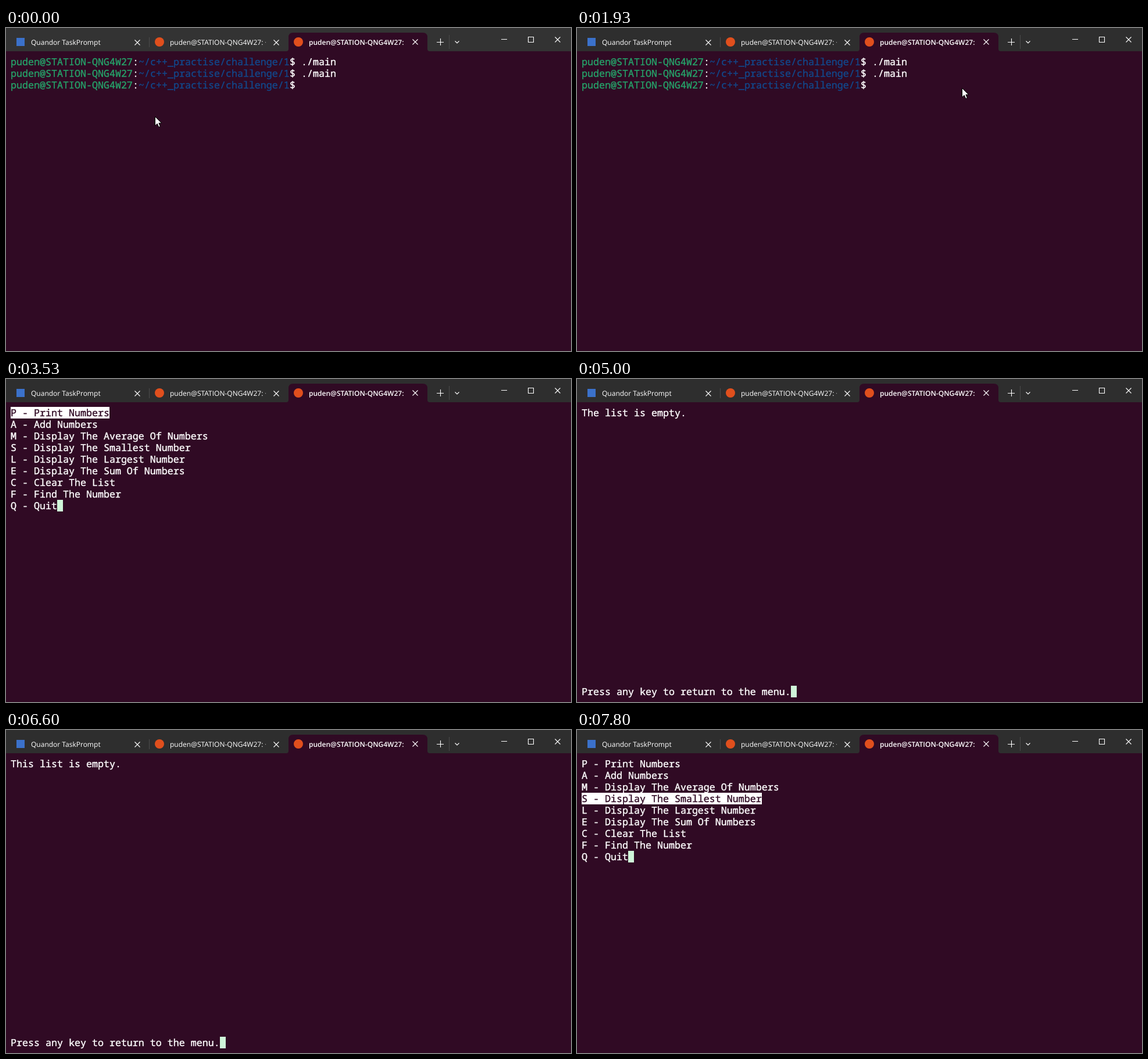
An HTML page that plays this animation: 972x556 px, repeating every 8000 ms.

```html
<!DOCTYPE html>
<html lang="en">
<head>
<meta charset="utf-8">
<title>Terminal menu</title>
<style>
  html, body { margin: 0; width: 100%; height: 100%; overflow: hidden; background: #300a24; }
  svg { display: block; width: 972px; height: 556px; }
  text { white-space: pre; text-rendering: geometricPrecision; }
  .term text { font: 16.667px "Noto Sans Mono", "DejaVu Sans Mono", monospace; fill: #fff; stroke: #fff; stroke-width: .4px; }
  .term .user { fill: #26a269; stroke: #26a269; }
  .term .path { fill: #12488b; stroke: #12488b; }
  .term .dark { fill: #300a24; stroke: #300a24; }
  .title { font: 12px "Open Sans", "Noto Sans", sans-serif; fill: #fff; }
  .active { font-weight: 600; }
  .line { fill: none; stroke: #fff; stroke-width: 1.1; }
</style>
</head>
<body>
<svg viewBox="0 0 972 556">
  <defs>
    <path id="cross" class="line" d="M-4.5-4.5 4.5 4.5M4.5-4.5-4.5 4.5"/>
    <clipPath id="clipA"><rect x="282" y="10" width="165" height="28"/></clipPath>
    <clipPath id="clipB"><rect x="521" y="10" width="164" height="28"/></clipPath>
  </defs>
  <rect width="972" height="556" fill="#300a24"/>
  <rect id="bar" width="972" height="40"/>
  <path fill="#300a24" d="M482 40q4 0 4-4V16q0-8 8-8H717q8 0 8 8V36q0 4 4 4z"/>
  <path d="M246.5 16V33M762.5 12V36" stroke="#4b4b4b"/>
  <rect x="18" y="17" width="14" height="14" fill="#3b71ca"/>
  <circle cx="264" cy="24" r="8" fill="#e04f1d"/>
  <circle cx="503" cy="24" r="8" fill="#e04f1d"/>
  <text class="title" x="43" y="29">Quandor TaskPrompt</text>
  <g clip-path="url(#clipA)"><text class="title" x="282" y="29">puden@STATION-QNG4W27: ~</text></g>
  <g clip-path="url(#clipB)"><text class="title active" x="521" y="29">puden@STATION-QNG4W27: ~/c++</text></g>
  <use href="#cross" x="226" y="25"/>
  <use href="#cross" x="465" y="25"/>
  <use href="#cross" x="704" y="24"/>
  <use href="#cross" x="949" y="20"/>
  <path class="line" d="M741 24.5H753M747.5 18V30M772.5 22.5 776 26 779.5 22.5M852 19.5H862M898.5 15.5h9v9h-9z"/>
  <g class="term" id="term"></g>
  <path id="mouse" d="M.5.5V16.2L4.2 12.7 6.8 18.6 9.4 17.5 6.9 11.8H11.7Z" fill="#fff" stroke="#000"/>
</svg>
<script>
const LOOP = 8000, CELL = 10, ROW = 20, LEFT = 8, TOP = 48;
const MENU = [
  "P - Print Numbers", "A - Add Numbers", "M - Display The Average Of Numbers",
  "S - Display The Smallest Number", "L - Display The Largest Number",
  "E - Display The Sum Of Numbers", "C - Clear The List", "F - Find The Number", "Q - Quit"
];
const USER = "puden@STATION-QNG4W27", PATH = "~/c++_practise/challenge/1", COMMAND = "./main";

// Each step changes only the listed parts of the state.
const STEPS = [
  [0, { view: "shell", typed: 0, block: false, mouse: [256, 152], focus: false }],
  [270, { mouse: [262, 154] }],
  [330, { mouse: [310, 156] }],
  [400, { mouse: [440, 142] }],
  [470, { mouse: [565, 121] }],
  [530, { mouse: [642, 107] }],
  [600, { mouse: [662, 103] }],
  [1200, { focus: true, mouse: [662, 102] }],
  [1330, { block: true }],
  [1530, { mouse: [662, 103] }],
  [1930, { block: false }],
  [2200, { typed: 1, block: true }],
  [2270, { mouse: null }],
  [2530, { typed: 2 }],
  [2670, { typed: 3 }],
  [2730, { mouse: [662, 103] }],
  [2870, { typed: 4 }],
  [2930, { mouse: null }],
  [3070, { typed: 5 }],
  [3130, { typed: 6 }],
  [3530, { view: "menu", pick: 0 }],
  [4070, { block: false }],
  [4670, { block: true }],
  [5000, { view: "message", message: "The list is empty." }],
  [5530, { block: false }],
  [5600, { view: "menu", block: true }],
  [6130, { pick: 1 }],
  [6400, { pick: 2 }],
  [6600, { view: "message", message: "This list is empty." }],
  [7200, { block: false }],
  [7270, { view: "menu" }],
  [7330, { block: true }],
  [7800, { pick: 3 }]
];

const [bar, term, mouse] = ["bar", "term", "mouse"].map(id => document.getElementById(id));

const rect = (col, row, cols, fill) =>
  `<rect x="${LEFT + col * CELL}" y="${TOP + row * ROW}" width="${cols * CELL}" height="${ROW}" fill="${fill}"/>`;
const text = (col, row, str, cls = "") =>
  `<text class="${cls}" x="${LEFT + col * CELL}" y="${TOP + row * ROW + 16}">${str}</text>`;
const block = (state, col, row) => state.block ? rect(col, row, 1, "#cff5d9") : "";

function prompt(row, command) {
  const colon = USER.length, dollar = colon + 1 + PATH.length;
  return text(0, row, USER, "user") + text(colon, row, ":") +
    text(colon + 1, row, PATH, "path") + text(dollar, row, "$ " + command);
}

const views = {
  shell: s => prompt(0, COMMAND) + prompt(1, COMMAND) +
    prompt(2, COMMAND.slice(0, s.typed)) + block(s, 50 + s.typed, 2),
  menu: s => MENU.map((item, i) => i === s.pick
    ? rect(0, i, item.length, "#fff") + text(0, i, item, "dark")
    : text(0, i, item)).join("") + block(s, 8, 8),
  message: s => text(0, 0, s.message) +
    text(0, 24, "Press any key to return to the menu.") + block(s, 36, 24)
};

function draw(state) {
  bar.setAttribute("fill", state.focus ? "#2e2e2e" : "#333");
  term.innerHTML = views[state.view](state);
  mouse.setAttribute("visibility", state.mouse ? "visible" : "hidden");
  if (state.mouse) mouse.setAttribute("transform", `translate(${state.mouse})`);
}

const start = performance.now();
let shown = 0;
function tick() {
  const time = Math.max(0, performance.now() - start) % LOOP;
  const count = STEPS.filter(([at]) => at <= time).length;
  if (count !== shown) {
    shown = count;
    draw(Object.assign({}, ...STEPS.slice(0, count).map(step => step[1])));
  }
  requestAnimationFrame(tick);
}
tick();
</script>
</body>
</html>
```
